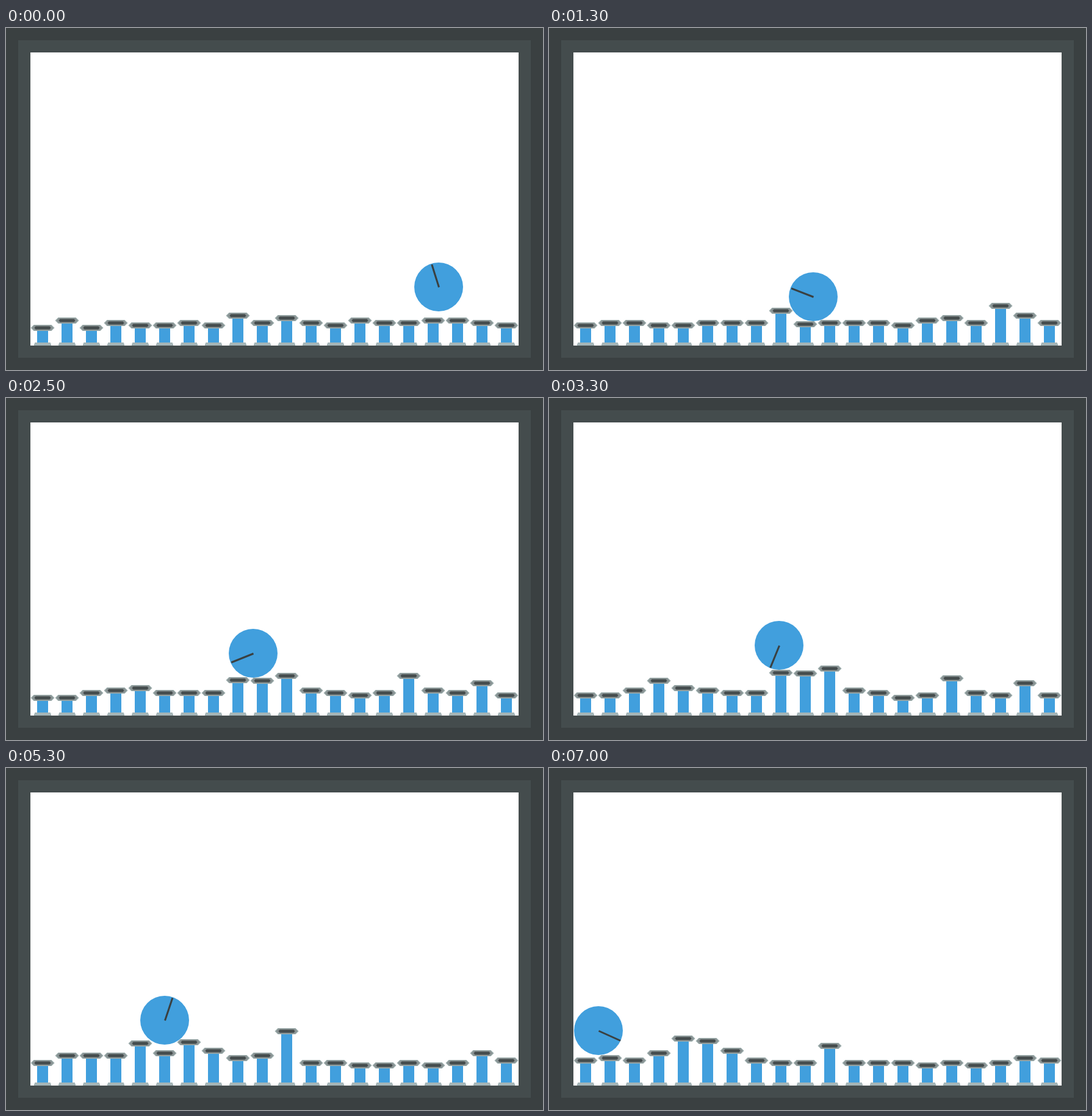
Animation, 880 px wide and 560 px high, one loop 7100 ms. Source, as an HTML page with a canvas:

```html
<!DOCTYPE html>
<html lang="en">
<head>
<meta charset="utf-8">
<title>Piston ball</title>
<style>
html, body { margin: 0; width: 100%; height: 100%; overflow: hidden; background: #3a4041; }
canvas { display: block; }
</style>
</head>
<body>
<canvas id="stage" width="880" height="560"></canvas>
<script>
const ctx = document.getElementById('stage').getContext('2d');
const LOOP = 7100, STEP = 100;
const PISTONS = 20, FLOOR = 520, LOWEST = 491, NOTCH = 4, RADIUS = 40;
const BLUE = '#419fdd', DARK = '#3a4041', SLATE = '#444c4d';

// Key points of the ball's path: time, x, y.
const path = [
  [0, 709, 424], [400, 630, 437], [1300, 433, 440], [2500, 405, 418],
  [3500, 370, 402], [4100, 271, 445], [4600, 258, 408], [5300, 260, 413],
  [6100, 183, 425], [6450, 143, 416], [7000, 81, 430]
];

// Swells that lift neighbouring pistons for a while.
const swells = [
  { at: 10, time: 4700, rise: 52, width: 0.5, span: 2800 },
  { at: 8.5, time: 3700, rise: 52, width: 1, span: 1400 },
  { at: 4.7, time: 7000, rise: 45, width: 1.7, span: 1800 },
  { at: 6.3, time: 5400, rise: 36, width: 0.8, span: 700 },
  { at: 4, time: 5300, rise: 18, width: 0.4, span: 500 },
  { at: 1.5, time: 6000, rise: 24, width: 2, span: 900 },
  { at: 3, time: 3400, rise: 18, width: 1.2, span: 900 },
  { at: 15, time: 2900, rise: 30, width: 0.5, span: 1700 },
  { at: 17, time: 1200, rise: 34, width: 0.6, span: 900 },
  { at: 18, time: 4400, rise: 26, width: 0.5, span: 2600 },
  { at: 8, time: 700, rise: 22, width: 0.5, span: 1500 }
];

const mix = (a, b, k) => a + (b - a) * k;
const bell = d => Math.exp(-d * d);

function random(i, j) {
  const n = Math.sin(i * 12.9898 + j * 78.233) * 43758.5453;
  return n - Math.floor(n);
}

function ballAt(t) {
  const i = Math.max(1, path.findIndex(p => p[0] >= t));
  const [t0, x0, y0] = path[i - 1], [t1, x1, y1] = path[i];
  const k = (t - t0) / (t1 - t0);
  const x = Math.round(mix(x0, x1, k)), y = Math.round(mix(y0, y1, k));
  // Rolling turns the pointer with the distance; it slips a little.
  const degrees = -107.5 + 1.51 * (x - path[0][1]) + 6 * Math.sin(2 * Math.PI * t / 7000);
  return { x, y, angle: degrees * Math.PI / 180 };
}

function capHeight(i, x, t, ball) {
  const beat = t / 1200, n = Math.floor(beat);
  let lift = 3 * NOTCH * mix(random(i, n), random(i, n + 1), beat - n);
  for (const s of swells) {
    lift += s.rise * bell((i - s.at) / s.width) * bell((t - s.time) / s.span);
  }
  const y = LOWEST - NOTCH * Math.round(lift / NOTCH);
  // A cap never pushes into the ball.
  const dx = Math.max(0, Math.abs(x - ball.x) - 15);
  if (dx >= RADIUS) return y;
  return Math.max(y, Math.round(ball.y + Math.sqrt(RADIUS * RADIUS - dx * dx) + 5));
}

function rect(color, x, y, w, h) {
  ctx.fillStyle = color;
  ctx.fillRect(x, y, w, h);
}

// A flat bar whose ends come to a point.
function bar(color, x, y, halfW, halfH, bevel) {
  const w = halfW - bevel;
  ctx.fillStyle = color;
  ctx.beginPath();
  ctx.moveTo(x - halfW, y);
  ctx.lineTo(x - w, y - halfH);
  ctx.lineTo(x + w, y - halfH);
  ctx.lineTo(x + halfW, y);
  ctx.lineTo(x + w, y + halfH);
  ctx.lineTo(x - w, y + halfH);
  ctx.fill();
}

function drawPiston(x, y) {
  rect(BLUE, x - 9, y, 18, FLOOR - y);
  rect('#a5b5b7', x - 13, FLOOR - 5, 26, 2);
  rect('#a5b5b7', x - 14, FLOOR - 3, 28, 3);
  bar('#9aabaa', x, y, 19.5, 5, 5);
  bar('#899293', x, y, 17.5, 4, 4);
  bar(SLATE, x, y, 13.5, 2.5, 2);
}

function drawBall({ x, y, angle }) {
  ctx.fillStyle = BLUE;
  ctx.beginPath();
  ctx.arc(x, y, RADIUS, 0, Math.PI * 2);
  ctx.fill();
  ctx.save();
  ctx.translate(x + 0.5, y + 0.5);
  ctx.rotate(angle);
  rect(DARK, 0, -1.5, RADIUS - 1, 3);
  ctx.restore();
}

function draw(t) {
  rect(DARK, 0, 0, 880, 560);
  rect(SLATE, 20, 20, 840, 520);
  rect('#fff', 40, 40, 800, 480);
  const ball = ballAt(t);
  for (let i = 0; i < PISTONS; i++) {
    const x = 60 + 40 * i;
    drawPiston(x, capHeight(i, x, t, ball));
  }
  drawBall(ball);
}

const start = performance.now();
function tick() {
  const t = (performance.now() - start) % LOOP;
  draw(Math.floor(t / STEP) * STEP);
  requestAnimationFrame(tick);
}
tick();
</script>
</body>
</html>
```
